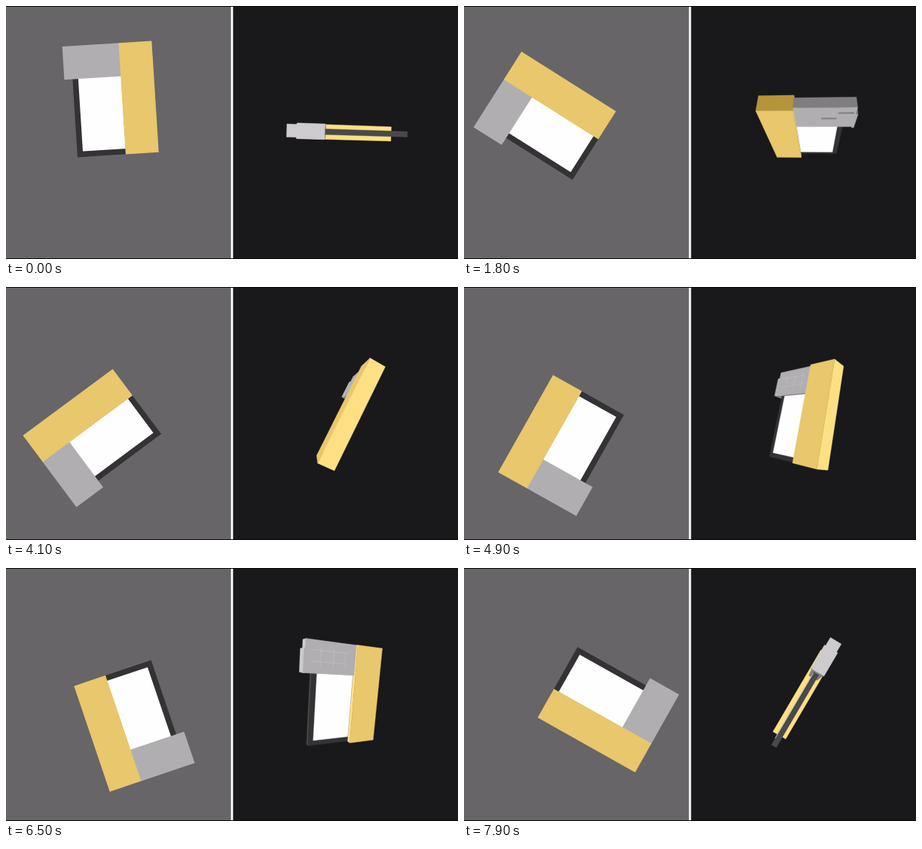
Recreate the animation shown at these times as an HTML page with a canvas. Size 600 px wide and 337 px high, loop 8000 ms.

```html
<!DOCTYPE html>
<html lang="en">
<head>
<meta charset="utf-8">
<title>Rotating blocks</title>
<style>
html, body { margin: 0; width: 100%; height: 100%; overflow: hidden; background: #19181a; }
canvas { display: block; width: 600px; height: 337px; }
</style>
</head>
<body>
<canvas id="stage" width="600" height="337"></canvas>
<script>
const ctx = document.getElementById('stage').getContext('2d');
const LOOP = 8000, RAD = Math.PI / 180;
const FOCAL = 262, DIST = 300, CX = 450.5, CY = 168.5;

// Face colours by axis: x sides, y ends, z front and back
const YELLOW = ['#fde084', '#b5953a', '#e8c76d'];
const GRAY = ['#cdcbcd', '#7f7d7f', '#b0aeb0'];
const DARK = ['#4a494a', '#2c2a2c', '#343234'];
const WHITE = '#fefefe';

// Boxes: [min, max] along x, y, z
const bar = [[8, 52], [-74, 74], [-11.5, 11.5]];
const head = [[-67, 8], [-74, -30], [-7.5, 7.5]];
const knob = [[-69.5, -67], [-62, -30], [-9, 9]];
const panel = [[-56, 8], [-30, 74], [-3.5, 3.5]];

let project, eye;

function setPose(yaw, pitch) {
  const sy = Math.sin(yaw), cy = Math.cos(yaw);
  const sp = Math.sin(pitch), cp = Math.cos(pitch);
  // Images of the object axes as right, down, toward
  const X = [cy, 0, -sy];
  const Y = [-sy * sp, cp, -cy * sp];
  const Z = [sy * cp, sp, cy * cp];
  eye = [X[2] * DIST, Y[2] * DIST, Z[2] * DIST];
  project = ([x, y, z]) => {
    const [r, d, n] = [0, 1, 2].map(i => X[i] * x + Y[i] * y + Z[i] * z);
    const s = FOCAL / (DIST - n);
    return [CX + r * s, CY + d * s];
  };
}

function poly(points, color) {
  ctx.beginPath();
  points.forEach(p => ctx.lineTo(...project(p)));
  ctx.closePath();
  ctx.fillStyle = ctx.strokeStyle = color;
  ctx.lineWidth = 0.4;
  ctx.fill();
  ctx.stroke();
}

function box(ranges, colors) {
  for (let axis = 0; axis < 3; axis++) {
    const u = (axis + 1) % 3, v = (axis + 2) % 3;
    for (const side of [0, 1]) {
      const level = ranges[axis][side];
      if (side ? eye[axis] <= level : eye[axis] >= level) continue;
      poly([[0, 0], [1, 0], [1, 1], [0, 1]].map(([i, j]) => {
        const p = [];
        p[axis] = level;
        p[u] = ranges[u][i];
        p[v] = ranges[v][j];
        return p;
      }), colors[axis]);
    }
  }
}

function patch(x0, y0, x1, y1, z, color) {
  if (z > 0 ? eye[2] > z : eye[2] < z)
    poly([[x0, y0, z], [x1, y0, z], [x1, y1, z], [x0, y1, z]], color);
}

function drawPanel() {
  box(panel, DARK);
  for (const z of [-3.5, 3.5]) patch(-48.5, -30, 8, 66.7, z, WHITE);
}

function drawHead() {
  const parts = [() => box(knob, GRAY), () => {
    box(head, GRAY);
    patch(-45, -52, -26, -49, -7.5, '#858385');
    patch(-65, -64, -46, -61, -7.5, '#858385');
    // Faint seams on the front
    for (const x of [-46, -27, -9]) patch(x, -64, x + 0.4, -39, 7.5, '#bdbbbd');
    for (const y of [-61, -46]) patch(-60, y, -4, y + 0.4, 7.5, '#bdbbbd');
  }];
  if (eye[0] < -67) parts.reverse();
  parts.forEach(f => f());
}

function drawBody() {
  const parts = [drawPanel, drawHead];
  if (eye[1] > -30) parts.reverse();
  parts.forEach(f => f());
}

function drawSolid(t) {
  setPose((90 + 45 * t) * RAD, (-90 + 15 * t) * RAD);
  const parts = [drawBody, () => box(bar, YELLOW)];
  if (eye[0] < 8) parts.reverse();
  parts.forEach(f => f());
}

function rect(color, x, y, w, h) {
  ctx.fillStyle = color;
  ctx.fillRect(x, y, w, h);
}

function drawFlat(t) {
  ctx.save();
  ctx.translate(149, 168.5);
  ctx.rotate(-30 * t * RAD);
  rect(DARK[2], -56, -80, 65, 109.5);
  rect(WHITE, -48.5, -80, 57, 102);
  rect(GRAY[2], -67, -119, 76, 44.3);
  rect(YELLOW[2], 8, -119, 44, 148.5);
  ctx.restore();
}

function frame(now) {
  const t = (now % LOOP) / 1000 + 0.12;
  rect('#676567', 0, 0, 300, 337);
  rect('#19181a', 300, 0, 300, 337);
  drawFlat(t);
  drawSolid(t);
  rect('#fff', 298.6, 0, 2.8, 337);
  rect('#0c0b0c', 0, 0, 600, 1);
  rect('#0c0b0c', 0, 336, 600, 1);
  requestAnimationFrame(frame);
}
requestAnimationFrame(frame);
</script>
</body>
</html>
```
